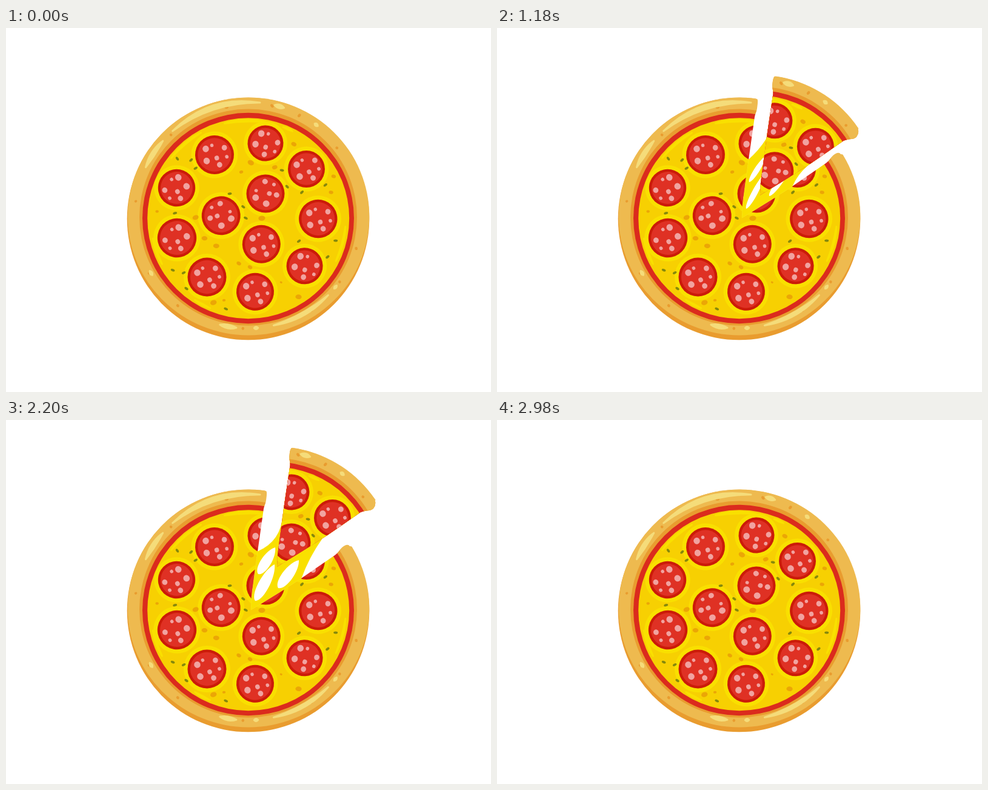
These frames come from a looping animation (800x600 px, 3.68 s). An HTML page:

```html
<!DOCTYPE html>
<html lang="en">
<head>
<meta charset="utf-8">
<title>Pizza slice</title>
<style>
  html, body { margin: 0; width: 100%; height: 100%; overflow: hidden; background: #fff; }
  svg { display: block; width: 100vw; height: 100vh; }
</style>
</head>
<body>
<svg viewBox="0 0 800 600">
  <defs>
    <path id="cutShape" d="M404 313L405 293L415 217L424.5 150C425.5 141 428.5 139 429.3 130Q430.8 119 429.5 117.5Q428 116 424 115V100H620V215L567 208Q564 203.5 557 208C550 213 549 218 543 222.5L487 261L459 279Z"/>
    <clipPath id="cutClip"><use href="#cutShape"/></clipPath>
    <clipPath id="sliceClip">
      <path d="M404 313L405 293L415 217L425.5 146C426 139 423.5 137 424.5 129Q425.5 116 430 116.5L434 100H600L590 195L565.5 203.5Q568 210 563 217Q559 220.5 552 220.5Q547 221 542 223L487 261L459 279Z"/>
    </clipPath>
  </defs>
  <g id="pizza">
    <circle cx="399.5" cy="314.5" r="199.8" fill="#e99c2f"/>
    <ellipse cx="400" cy="310.5" rx="199.3" ry="196" fill="#eeba4f"/>
    <ellipse cx="399.5" cy="312" rx="179.5" ry="178.5" fill="#e99c2f"/>
    <ellipse cx="399.5" cy="313.5" rx="174.5" ry="173.7" fill="#db2b1d"/>
    <ellipse cx="399.7" cy="313.7" rx="166.5" ry="165.5" fill="#f7d002"/>
    <g id="toppings"></g>
  </g>
  <g id="pull">
    <use href="#cutShape" fill="#fff"/>
    <path id="strings" fill="#f9e000" stroke="#f9e000" stroke-width=".8"/>
    <path id="holes" fill="#fff" clip-path="url(#cutClip)"/>
    <g id="slice"><g clip-path="url(#sliceClip)"><use href="#pizza"/></g></g>
  </g>
</svg>
<script>
const $ = id => document.getElementById(id);
const CX = 399.5, CY = 313.5;
const CRUST = '#e99c2f', SHINE = '#f5dc7a', BRIGHT = '#f9e000', SPOT = '#eba606', HERB = '#85890c';

let seed = 11;
function rand(min = 0, max = 1) {
  seed = (seed * 16807) % 2147483647;
  return min + (max - min) * seed / 2147483647;
}

function polar(deg, r, cy = CY) {
  const a = deg * Math.PI / 180;
  return [CX + r * Math.cos(a), cy + r * Math.sin(a)];
}

const oval = (x, y, rx, ry, turn, fill) =>
  `<ellipse rx="${rx}" ry="${ry}" fill="${fill}" transform="translate(${x} ${y}) rotate(${turn})"/>`;

// curved streak along a ring, thickest in the middle
function streak(from, to, width, r, cy, fill) {
  const a = polar(from, r, cy), b = polar(to, r, cy);
  const side = s => polar((from + to) / 2, r + s * width / 2, cy).map((v, i) => 2 * v - (a[i] + b[i]) / 2);
  return `<path d="M${a}Q${side(1)} ${b}Q${side(-1)} ${a}Z" fill="${fill}" stroke="${fill}" stroke-width="3" stroke-linejoin="round"/>`;
}

// from, to (degrees), width
const crustShine = [[205, 221, 6], [228, 276, 7], [-76.5, -71.5, 6], [-54, -52, 4], [38.5, 40.5, 3],
  [45, 77, 5], [85, 87, 4], [96, 104.5, 6], [148, 150.5, 4]];
const cheeseShine = [[256, 280, 3], [218, 241, 2], [5, 26, 2], [152, 168, 2], [113, 123, 2], [-69, -63, 2]];

// x, y, radius, rotation, mirrored
const pepperoni = [
  [344, 209, 32, 10], [428, 190, 29.5, 43], [495.5, 232.5, 30.5, 0], [281.5, 263.5, 30.7, -57, true],
  [428, 273, 31.5, -46], [354.7, 309.3, 32, 40, true], [514.8, 314.5, 31.7, 10], [282, 346, 32.2, -57, true],
  [421.3, 356.3, 31.5, 10], [492.6, 392.3, 30, 43], [331.5, 410.5, 32, 0], [411, 434.7, 31, 8]
];
// angle, distance, radius of the fat dots
const dots = [[204, 17.5, 5.5], [244, 16.2, 2.9], [314, 20, 4.6], [359, 20.5, 3], [45, 6.4, 4], [132, 16.5, 5.5], [53, 18.4, 4.6]];

const dotArt = dots.map(([deg, r, size]) => {
  const [x, y] = polar(deg, r);
  return oval(x - CX, y - CY, size, size * .95, 65, '#f1a3a0');
}).join('');

const pepperoniArt = ([x, y, r, turn, mirrored]) => `
  <g transform="translate(${x} ${y}) rotate(${turn}) scale(${mirrored ? -1 : 1} 1)">
    <circle r="${r + 6.5}" fill="${BRIGHT}"/><circle r="${r}" fill="#cb1b09"/>
    <circle r="${r - 4.3}" fill="#df3124"/>${dotArt}
  </g>`;

// random places on the cheese, clear of the pepperoni and of each other
function scatter(count, taken) {
  const found = [];
  while (found.length < count) {
    const p = polar(rand(0, 360), 157 * Math.sqrt(rand()));
    const far = (q, d) => Math.hypot(p[0] - q[0], p[1] - q[1]) > d;
    if (pepperoni.every(q => far(q, q[2] + 6)) && taken.every(q => far(q, 12))) {
      found.push(p);
      taken.push(p);
    }
  }
  return found;
}

function toppings() {
  const taken = [];
  const crust = Array.from({ length: 12 }, (_, i) =>
    oval(...polar(i * 30 + rand(-38, -10), rand(183, 189), 312), rand(2, 3.3), 2.3, rand(0, 180), CRUST));
  const spots = scatter(17, taken).map(([x, y]) => {
    const size = rand(2, 6);
    return oval(x, y, size, size * .75, rand(-20, 30), SPOT);
  });
  const leaves = scatter(18, taken).map(([x, y]) => oval(x, y, 3.5, 2, rand(-45, 60), HERB));
  return [
    ...crust,
    ...crustShine.map(s => streak(...s, 186.5, 308.5, SHINE)),
    ...cheeseShine.map(s => streak(...s, 161, CY, BRIGHT)),
    ...pepperoni.map(pepperoniArt), ...spots, ...leaves
  ].join('');
}
$('toppings').innerHTML = toppings();

const LOOP = 3680, STEP = 30, OPEN = 700, CLOSED = 2980;

const clamp = v => Math.min(1, Math.max(0, v));
const ease = v => (1 - Math.cos(Math.PI * clamp(v))) / 2;
const leftEdge = y => [415 - (y - 217) * .132, y];
const rightEdge = x => [x, 261 - (x - 487) * .67];

// both tips and width, while stretched and when torn
const holes = [
  { tight: [444, 210, 416, 254, 14], torn: [436, 232, 402, 270, 18] },
  { tight: [443, 238, 411, 298, 15], torn: [440, 266, 409, 303, 17] },
  { tight: [483, 231, 449, 277, 15], torn: [491, 237, 442, 289, 20] }
];

// control point beside the middle of a-b
function bow(a, b, size) {
  const dx = b[0] - a[0], dy = b[1] - a[1], len = Math.hypot(dx, dy) || 1;
  return [(a[0] + b[0]) / 2 - dy / len * size, (a[1] + b[1]) / 2 + dx / len * size];
}

// pointed at the first tip, rounder at the second
function lens([x1, y1, x2, y2, w]) {
  const dx = x2 - x1, dy = y2 - y1, len = Math.hypot(dx, dy), h = w / 1.5;
  const at = (k, side) => `${x1 + dx * k - dy / len * h * side} ${y1 + dy * k + dx / len * h * side}`;
  return `M${x1} ${y1}C${at(.25, 1)} ${at(.92, 1)} ${x2} ${y2}C${at(.92, -1)} ${at(.25, -1)} ${x1} ${y1}Z`;
}

function draw(t) {
  const moving = t >= OPEN && t < CLOSED;
  $('pull').style.display = moving ? '' : 'none';
  if (!moving) return;
  t = OPEN + Math.floor((t - OPEN) / STEP) * STEP;

  const out = ease((t - 665) / 1000), back = ease((t - 2496) / 480);
  const tear = clamp((t - 2290) / 450);
  const ox = 43 * (1 - (1 - out) ** 1.6) * (1 - back), oy = -71 * out * (1 - back);
  const shift = ([x, y]) => [x + ox, y + oy];

  const l0 = leftEdge(217 + 14 * tear), l1 = shift(leftEdge(217 + 10 * out ** 2 + 14 * tear));
  const r0 = rightEdge(487 + 14 * tear), r1 = shift(rightEdge(487 - 9 * out + 14 * tear));
  const sag = 23 * out ** 3 * (1 - tear);
  $('strings').setAttribute('d', `M404 313L405 293L${l0}Q${bow(l0, l1, sag)} ${l1}` +
    `L${shift([410, 300])}L${r1}Q${bow(r1, r0, 5)} ${r0}L459 279Z`);

  const stretch = out ** .7 + .25 * clamp((t - 1540) / 750);
  $('holes').setAttribute('d', holes.map(({ tight, torn }) => {
    const [w0, w1] = [tight[4] * stretch, torn[4]];
    const tips = tight.slice(0, 4).map((v, i) => v + (torn[i] - v) * tear);
    return lens([...tips, w0 + (w1 - w0) * tear]);
  }).join(''));
  $('slice').setAttribute('transform', `translate(${ox} ${oy})`);
}

function tick() {
  draw(performance.now() % LOOP);
  requestAnimationFrame(tick);
}
tick();
</script>
</body>
</html>
```
